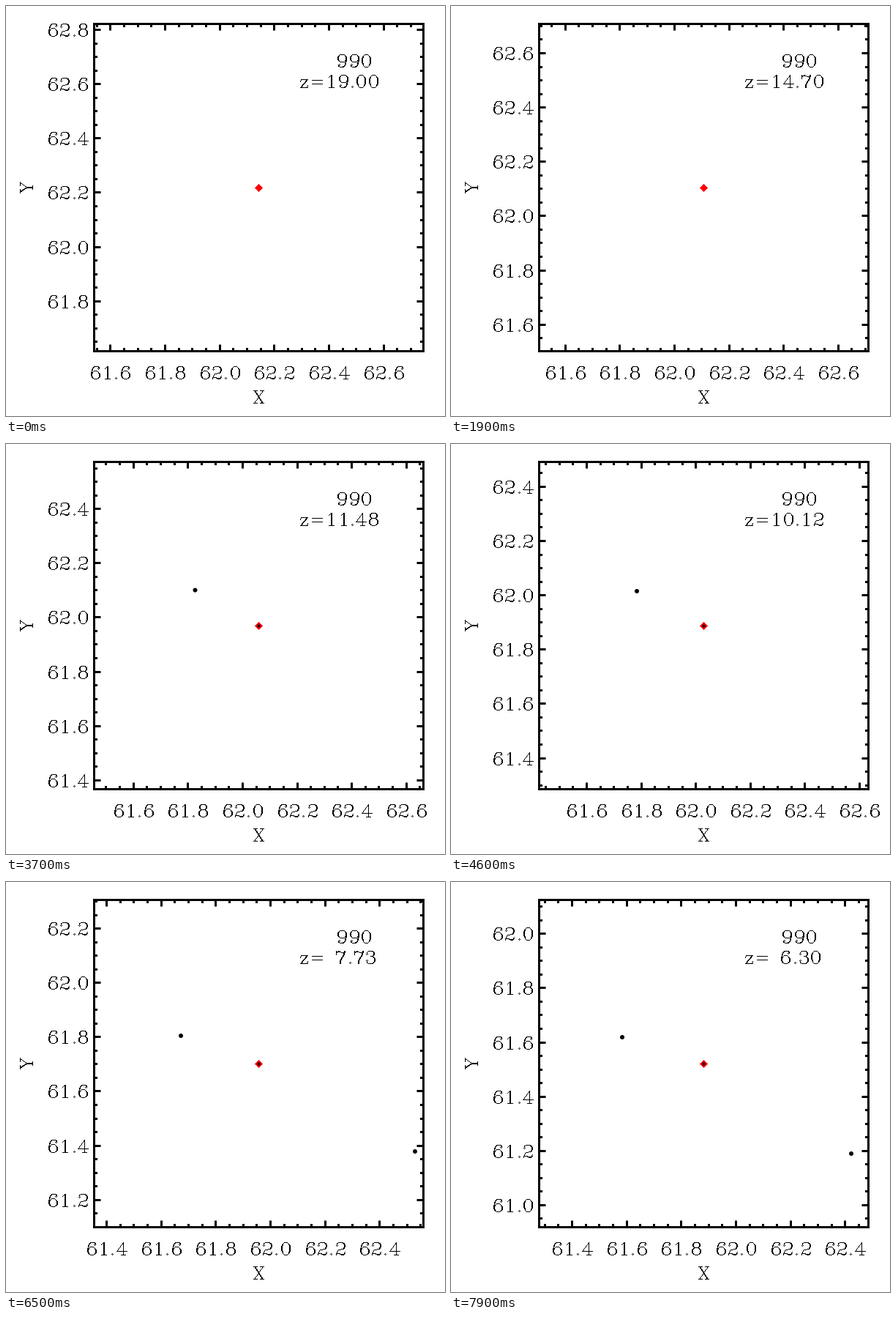
Write a matplotlib script that moves like this. It is 600 px wide and 560 px high and loops after 8 s.

```python
import math

import matplotlib.pyplot as plt
import numpy as np
from matplotlib.animation import FuncAnimation
from matplotlib.collections import LineCollection
from matplotlib.patches import Circle, Polygon, Rectangle

W, H, DPI = 600, 560, 100
FRAMES, STEP = 80, 100
PX = 72 / DPI

# Plot box in pixels and its span in data units
LEFT, RIGHT, TOP, BOTTOM = 120.5, 570.5, 24.5, 471.5
MID_X, MID_Y = 345.5, 248.5
SPAN = 1.206
SCALE_X = (RIGHT - LEFT) / SPAN
SCALE_Y = (BOTTOM - TOP) / SPAN
MAJOR, MINOR = 9, 4.5

# The scale factor grows at a constant rate; the view drifts along with it
RATE = 0.012759
STEPS = np.array([0, 11, 27, 46, 58, 65, 79])
VIEW_X = [62.143, 62.124, 62.089, 62.029, 61.991, 61.957, 61.882]
VIEW_Y = [62.2175, 62.153, 62.049, 61.887, 61.7735, 61.701, 61.5205]

# Companions: steps, then pixel x and y
NEAR = ([20, 27, 46, 58, 65, 79], [266.5, 263.5, 254, 243, 239, 234],
        [197, 198, 201, 206, 210, 212])
FAR = ([50, 58, 65, 79], [570, 564, 559, 547], [362, 365, 368, 371])
CORE_START = 37

# Plotter font: x is centred on the glyph, y goes up from the baseline
UNIT = 0.82
CAP = 21
ADVANCE = {".": 10, "=": 26, "z": 18, " ": 16, "Y": 19}


def arc(x, y, rx, ry, a=0, b=360):
    """Slightly squared ellipse from angle a to b."""
    t = np.radians(np.linspace(a, b, 25))
    c, s = np.cos(t), np.sin(t)
    return list(zip(x + rx * np.sign(c) * abs(c) ** 0.8,
                    y + ry * np.sign(s) * abs(s) ** 0.8))


def ring(y, rx, ry):
    return [arc(0, y, rx, ry), arc(0, y, rx - 1, ry)]


def bow(y, rx, ry, a, b):
    """Open curve, drawn double on its right side."""
    return [arc(0, y, rx, ry, a, b),
            arc(0, y, rx - 1, ry, min(a, 90), max(b, -90))]


def knob(x, y):
    return [[(x - 1, y), (x, y + 1), (x + 1, y), (x, y - 1), (x - 1, y)]]


def bar(y, a, b):
    return [[(a, y), (b, y)]]


def double(*points):
    return [list(points), [(x - 1, y) for x, y in points]]


def turn(strokes):
    return [[(-x, CAP - y) for x, y in s] for s in strokes]


def make_glyphs():
    two = bow(15, 7, 6, 160, -50)
    two[0] += [(-4, 8), (-7, 3), (-7, 0)]
    six = (ring(6.5, 7, 6.5) + knob(5, 17)
           + [arc(1, 6.5, 8, 14.5, 55, 180), arc(1, 6.5, 7, 14.5, 90, 180)])
    return {
        " ": [],
        ".": knob(0, 1),
        "=": bar(12, -9, 9) + bar(6, -9, 9),
        "0": ring(10.5, 7, 10.5),
        "1": double((1, CAP), (1, 0)) + [[(-4, 17), (1, CAP)]] + bar(0, -4, 5),
        "2": two + knob(-6, 16) + [[(-7, 2), (-4, 3), (1, 1), (5, 1), (7, 5)],
                                   [(-4, 3), (1, 0), (5, 0), (7, 3)]],
        "3": (bow(16.5, 6, 4.5, 160, -90) + bow(6, 7, 6, 90, -160)
              + knob(-6, 16) + knob(-6, 5)),
        "4": (double((3, CAP), (3, 0)) + [[(3, CAP), (-8, 6), (8, 6)]]
              + bar(0, -1, 6)),
        "5": (bow(7, 7, 7, 150, -160) + knob(-6, 5) + bar(CAP, -5, 5)
              + [[(-7, 11), (-5, CAP)], [(-5, 20), (0, 20), (5, CAP)]]),
        "6": six,
        "7": (double((7, CAP), (6, 15), (2, 10), (0, 5), (0, 0))
              + [[(-7, CAP), (-7, 15)],
                 [(-7, 17), (-4, CAP), (3, 18), (5, 18), (7, CAP)],
                 [(-6, 19), (-2, 20), (3, 18)]]),
        "8": ring(16.5, 6, 4.5) + ring(6, 7, 6),
        "9": turn(six),
        "z": (double((6, 14), (-5, 0)) + bar(14, -5, 6) + bar(0, -6, 6)
              + [[(-5, 14), (-6, 10)], [(5, 0), (6, 4)]]),
        "X": (double((-6, CAP), (7, 0)) + [[(7, CAP), (-7, 0)]]
              + [s for y in (0, CAP) for s in bar(y, -9, -3) + bar(y, 3, 9)]),
        "Y": (double((-6, CAP), (1, 10), (1, 0)) + [[(8, CAP), (1, 10)]]
              + bar(CAP, -9, -3) + bar(CAP, 4, 10) + bar(0, -3, 4)),
    }


def stamp(strokes):
    """Whole-pixel offsets (right, up) of all strokes of a glyph."""
    cells = set()
    for stroke in strokes:
        p = np.rint(np.array(stroke) * UNIT).astype(int)
        for a, b in zip(p, p[1:]):
            n = abs(b - a).max()
            for k in range(n + 1):
                u, v = np.floor(a + (b - a) * k / max(n, 1) + 0.5)
                cells.add((int(u), int(v)))
    return np.array(sorted(cells), int).reshape(-1, 2).T


STAMPS = {char: stamp(strokes) for char, strokes in make_glyphs().items()}


def write(canvas, string, x, y, align=0.0, upright=True):
    """Stamp a string; align is 0 left, 0.5 centre, 1 right."""
    widths = [ADVANCE.get(c, 20) * UNIT for c in string]
    pen = -align * sum(widths)
    for char, width in zip(string, widths):
        u, v = STAMPS[char]
        mid = pen + width / 2
        if upright:
            canvas[math.floor(y) - v, math.floor(x + mid) + u] = 0
        else:
            canvas[math.floor(y - mid) - u, math.floor(x) - v] = 0
        pen += width


def ticks(centre):
    """Yield (value, is_major) for every tick in view, 0.05 apart."""
    first = math.ceil((centre - SPAN / 2) * 20)
    last = math.floor((centre + SPAN / 2) * 20)
    for n in range(first, last + 1):
        yield n / 20, n % 4 == 0


def snap(v):
    return math.floor(v) + 0.5


def draw_axes(canvas, cx, cy):
    """Label both axes on the canvas and return the tick segments."""
    marks = []
    for value, major in ticks(cx):
        x = snap(MID_X + (value - cx) * SCALE_X)
        size = MAJOR if major else MINOR
        marks += [[(x, BOTTOM), (x, BOTTOM - size)], [(x, TOP), (x, TOP + size)]]
        if major:
            write(canvas, f"{value:.1f}", x, 509, 0.5)
    for value, major in ticks(cy):
        y = snap(MID_Y - (value - cy) * SCALE_Y)
        size = MAJOR if major else MINOR
        marks += [[(LEFT, y), (LEFT + size, y)], [(RIGHT, y), (RIGHT - size, y)]]
        if major:
            write(canvas, f"{value:.1f}", 113.5, y + 9, 1)
    return marks


fig = plt.figure(figsize=(W / DPI, H / DPI), dpi=DPI, facecolor="white")
ax = fig.add_axes([0, 0, 1, 1])
ax.axis("off")

paper = np.ones((H, W))
write(paper, "990", 451.5, 83)
write(paper, "X", MID_X, 542, 0.5)
write(paper, "Y", 36, MID_Y, 0.5, upright=False)
lettering = ax.imshow(paper, cmap="gray", vmin=0, vmax=1, aspect="auto",
                      extent=(0, W, H, 0), interpolation="nearest", zorder=0)
ax.set_xlim(0, W)
ax.set_ylim(H, 0)

ax.add_patch(Rectangle((LEFT, TOP), RIGHT - LEFT, BOTTOM - TOP, fill=False,
                       lw=3 * PX, ec="black", snap=False))
tick_lines = LineCollection([], colors="black", linewidths=3 * PX,
                            capstyle="butt", snap=False)
ax.add_collection(tick_lines, autolim=False)

R = 4.9
ax.add_patch(Polygon([(MID_X - R, MID_Y), (MID_X, MID_Y - R),
                      (MID_X + R, MID_Y), (MID_X, MID_Y + R)],
                     fc="red", lw=0, aa=False, zorder=4))


def dot(radius, color):
    return ax.add_patch(Circle((MID_X, MID_Y), radius, fc=color, lw=0,
                               zorder=5))


core = dot(2.2, "#300000")
companions = [(dot(3, "black"), NEAR), (dot(3, "black"), FAR)]
growth_steps = np.exp(RATE * STEPS)


def update(i):
    growth = math.exp(RATE * i)
    z = 1e4 / math.floor(500 * growth) - 1
    canvas = paper.copy()
    write(canvas, f"z={z:5.2f}", 400.5, 111)
    tick_lines.set_segments(draw_axes(canvas,
                                      np.interp(growth, growth_steps, VIEW_X),
                                      np.interp(growth, growth_steps, VIEW_Y)))
    lettering.set_data(canvas)
    core.set_visible(i >= CORE_START)
    for patch, (steps, xs, ys) in companions:
        patch.set_visible(i >= steps[0])
        patch.center = (np.interp(i, steps, xs), np.interp(i, steps, ys))
    return []


anim = FuncAnimation(fig, update, frames=FRAMES, interval=STEP, repeat=True,
                     repeat_delay=0)
plt.show()
```
